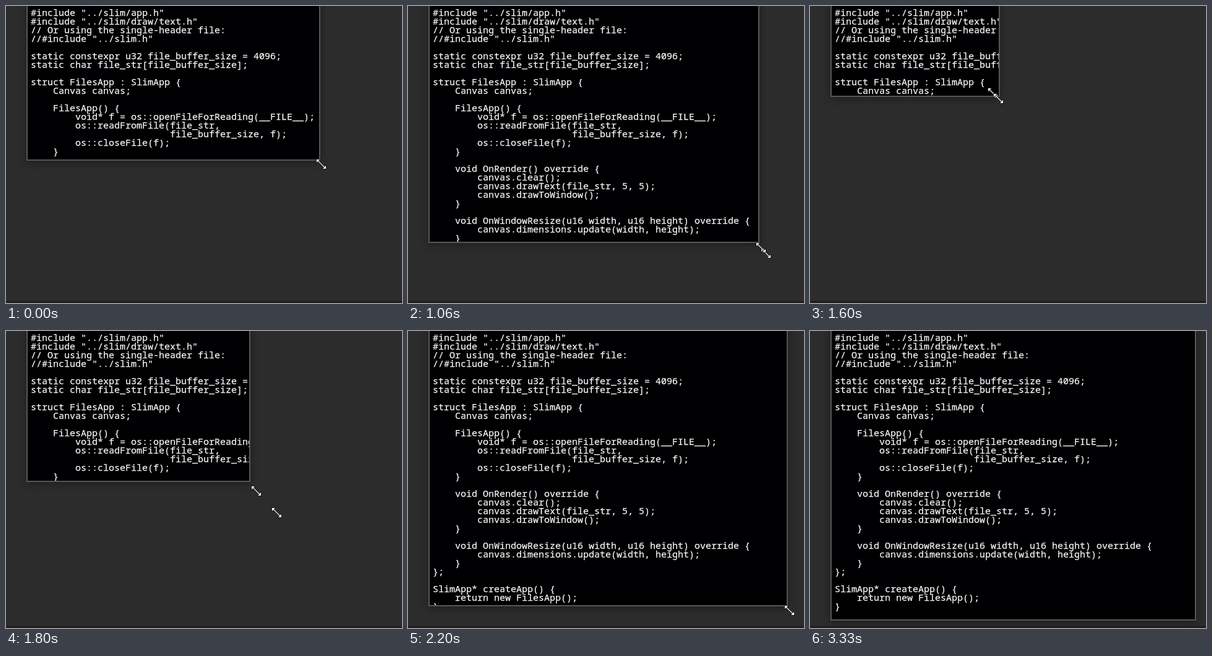
An HTML page that plays this animation: 640 by 480 pixels, repeating every 3.6 s.

```html
<!DOCTYPE html>
<html lang="en">
<head>
<meta charset="utf-8">
<title>Window resize</title>
<style>
  html, body { margin: 0; width: 100%; height: 100%; overflow: hidden; }
  #stage {
    position: relative; width: 640px; height: 480px; overflow: hidden;
    background: linear-gradient(#2c2c2c 477px, #241d21 477px);
  }
  #win {
    position: absolute; left: 33px; top: -40px; box-sizing: border-box;
    overflow: hidden; background: #000002; border: 2px solid #575757;
    box-shadow: 0 3px 13px rgba(0, 0, 0, .36);
  }
  pre {
    position: absolute; left: 5px; top: 41px; margin: 0; color: #f6f6f6;
    font: 500 15px/14px "Noto Sans Mono", "DejaVu Sans Mono", monospace;
    font-variant-ligatures: none;
    -webkit-text-stroke: .25px;
  }
  .cursor {
    position: absolute; left: 0; top: 0; width: 16px; height: 16px;
    overflow: visible; fill: #fff; stroke: #151515; stroke-width: 1.5;
    paint-order: stroke;
  }
</style>
</head>
<body>
<div id="stage">
  <div id="win"><pre>
#include "../slim/app.h"
#include "../slim/draw/text.h"
// Or using the single-header file:
//#include "../slim.h"

static constexpr u32 file_buffer_size = 4096;
static char file_str[file_buffer_size];

struct FilesApp : SlimApp {
    Canvas canvas;

    FilesApp() {
        void* f = os::openFileForReading(__FILE__);
        os::readFromFile(file_str,
                         file_buffer_size, f);
        os::closeFile(f);
    }

    void OnRender() override {
        canvas.clear();
        canvas.drawText(file_str, 5, 5);
        canvas.drawToWindow();
    }

    void OnWindowResize(u16 width, u16 height) override {
        canvas.dimensions.update(width, height);
    }
};

SlimApp* createApp() {
    return new FilesApp();
}
</pre></div>
  <svg class="cursor" id="trail"><use href="#arrow"/></svg>
  <svg class="cursor" id="pointer"><path id="arrow" d="M0 0H5L2.9 2.1 12.9 12.1 15 10V15H10L12.1 12.9 2.1 2.9 0 5Z"/></svg>
</div>
<script>
  const LOOP = 3600, RATE = 15, HIDE = 50;

  // Key points of the dragged corner: tick, x, y
  const keys = [
    [0, 507, 249], [5, 507, 249], [9, 524, 262], [16, 567, 382],
    [18, 606, 418], [25, 288, 130], [29, 530, 381], [33, 613, 444],
    [36, 625, 466], [39, 629, 465], [42, 621, 467], [46, 623, 467], [54, 623, 467]
  ];

  const [win, pointer, trail] = ["win", "pointer", "trail"].map(id => document.getElementById(id));

  // The picture changes 15 times a second, on whole centiseconds.
  const tickAt = ms => Math.ceil((Math.floor(ms / 10) * 10 + 10) * RATE / 1000) - 1;

  const slope = (i, n) => (keys[i + 1][n] - keys[i][n]) / (keys[i + 1][0] - keys[i][0]);

  // Harmonic mean of both sides, so the curve rests at its turning points.
  function tangent(i, n) {
    if (i === 0 || i === keys.length - 1) return 0;
    const a = slope(i - 1, n), b = slope(i, n);
    return a * b > 0 ? 2 * a * b / (a + b) : 0;
  }

  function cornerAt(tick) {
    const i = keys.findIndex(k => k[0] > tick) - 1;
    const a = keys[i], b = keys[i + 1];
    const span = b[0] - a[0], f = (tick - a[0]) / span, g = 1 - f;
    return [1, 2].map(n => Math.round(
      a[n] * g * g * (1 + 2 * f) + b[n] * f * f * (1 + 2 * g) +
      span * f * g * (tangent(i, n) * g - tangent(i + 1, n) * f)
    ));
  }

  function place(el, [x, y], shown) {
    el.style.transform = `translate(${x - 5}px, ${y - 1}px)`;
    el.style.visibility = shown ? "visible" : "hidden";
  }

  function draw() {
    const tick = tickAt(performance.now() % LOOP);
    const [right, bottom] = cornerAt(tick);
    win.style.width = right - 32 + "px";
    win.style.height = bottom + 41 + "px";

    // The pointer runs a little ahead of the window; fast moves show it twice.
    const near = cornerAt(tick + .1), far = cornerAt(tick + .5);
    const gap = Math.hypot(far[0] - near[0], far[1] - near[1]);
    place(pointer, near, tick < HIDE);
    place(trail, far, tick < HIDE && gap > 6);
    requestAnimationFrame(draw);
  }
  draw();
</script>
</body>
</html>
```
